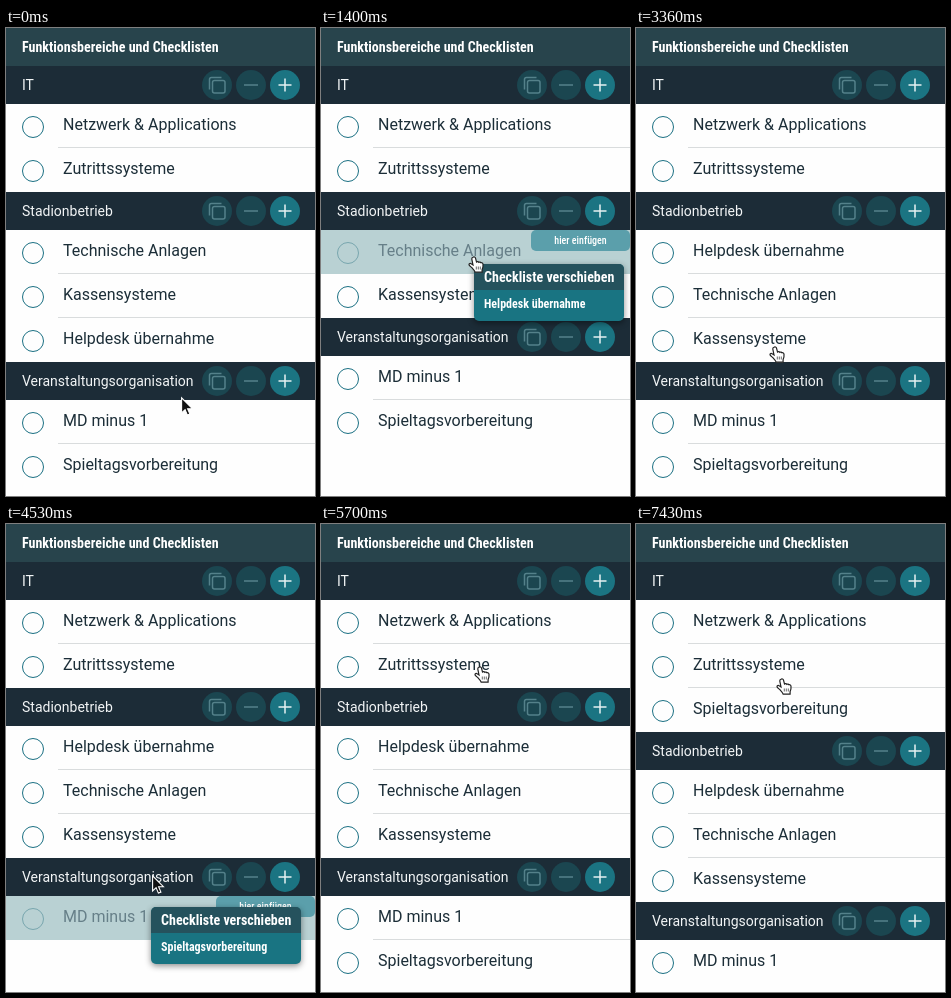
Write an HTML page that moves like this. It is 309 px wide and 468 px high and loops after 7.6 s.

```html
<!DOCTYPE html>
<html lang="de">
<head>
<meta charset="utf-8">
<title>Checklisten</title>
<style>
  html, body { margin: 0; width: 100%; height: 100%; overflow: hidden; background: #fefefe; }
  #stage { position: relative; width: 309px; height: 468px; overflow: hidden; background: #fefefe;
    font-family: Roboto, "Liberation Sans", sans-serif; color: #1c2e38; --fit: 1; }
  #stage * { box-sizing: border-box; white-space: nowrap; }
  #stage > * { position: absolute; left: 0; top: 0; }
  .narrow { font-family: "Roboto Condensed", Roboto, "Liberation Sans", sans-serif;
    font-stretch: 75%; font-weight: 700; color: #fff; }
  .title { width: 309px; height: 38px; padding-left: 16px; background: #28444c; line-height: 38px;
    font-size: calc(14px * var(--fit)); }
  .head { width: 309px; height: 38px; padding-left: 16px; background: #1c2c37; color: #f2f5f6;
    font-size: 14px; line-height: 38px; }
  .head svg { position: absolute; left: 195px; top: 3px; }
  .row { width: 309px; height: 44px; padding-left: 57px; font-size: 16px; line-height: 42px; }
  .row::before { content: ""; position: absolute; left: 16px; top: 12px; width: 20px; height: 20px;
    border: 1.3px solid #1b7083; border-radius: 50%; }
  .row.line::after { content: ""; position: absolute; left: 52px; right: 0; top: 43px; height: 1px;
    background: #d9dcdd; }
  .row.bare::before, .row.over::after { display: none; }
  .row.over { background: #b9d1d3; color: #667f88; }
  .row.over::before { border-color: #78a6ae; }
  #hint { width: 99px; height: 21px; left: 210px; border-radius: 5px; background: #5b9fab;
    font-size: calc(10px * var(--fit)); font-weight: 500; line-height: 21px; text-align: center; }
  #ghost { width: 150px; height: 57px; border-radius: 5px; overflow: hidden; background: #197482;
    box-shadow: 0 2px 6px rgba(0, 0, 0, .45); }
  #ghost div { height: 26px; padding-left: 10px; background: #25525d; line-height: 26px;
    font-size: calc(14px * var(--fit)); }
  #ghost p { margin: 0; padding-left: 10px; line-height: 28px; font-size: calc(12px * var(--fit)); }
</style>
</head>
<body>
<div id="stage">
  <div class="title narrow"><span id="caption">Funktionsbereiche und Checklisten</span></div>
</div>
<script>
const LOOP = 7600, HEAD = 38, ROW = 44, LAG = 40;
const heads = ["IT", "Stadionbetrieb", "Veranstaltungsorganisation"];
const names = {
  N: "Netzwerk & Applications", Z: "Zutrittssysteme",
  T: "Technische Anlagen", K: "Kassensysteme", H: "Helpdesk übernahme",
  M: "MD minus 1", S: "Spieltagsvorbereitung"
};

// [start, row order per section]
const orders = [
  [0, "NZ|TKH|MS"], [930, "NZ|TK|MS"], [1900, "NZ|TKH|MS"], [2530, "NZ|HTK|MS"],
  [4300, "NZ|HTK|M"], [5700, "NZ|HTK|MS"], [6100, "NZ|HTK|M"], [6160, "NZS|HTK|M"]
];
// [start, end, dragged row]
const drags = [[930, 1860, "H"], [4300, 5660, "S"]];
// [time, x, y] of the pointer tip
const path = [
  [0, 175, 369], [150, 173, 360], [450, 164, 322], [660, 162, 313],
  [930, 162, 313], [1030, 160, 300], [1250, 155, 244], [1400, 153, 228], [1600, 153, 217],
  [3030, 153, 217], [3130, 149, 235], [3360, 139, 318], [3560, 140, 374], [3760, 141, 398],
  [3800, 142, 400], [4100, 148, 427],
  [4300, 148, 427], [4400, 147, 412], [4490, 146, 380], [4530, 146, 351],
  [4960, 149, 183], [5000, 152, 167], [5060, 154, 165], [5200, 157, 152], [5430, 159, 142],
  [6760, 159, 143], [7160, 152, 150], [7330, 152, 150], [7430, 146, 154]
];

const stage = document.getElementById("stage");
const icons = `<svg width="100" height="32" fill="none" stroke-width="1.5">
  <g fill="#1b4650"><circle cx="16" cy="16" r="15"/><circle cx="50" cy="16" r="15"/></g>
  <circle cx="84" cy="16" r="15" fill="#1b7482"/>
  <g stroke="#54818a"><rect x="11.5" y="11.5" width="12.5" height="12.5" rx="2"/>
  <path d="M8.5 20.5V10.5a2 2 0 0 1 2-2H20.500M43 16h14"/></g>
  <path d="M77.500 16h13M84 9.500v13" stroke="#e6f1f2"/></svg>`;
const arrow = `<path d="M.6.9v15l3.500-3.300 2.300 5.500 2.500-1-2.300-5.400h4.800z"
  fill="#111" stroke="#fff" stroke-width="1.1"/>`;
const hand = `<path d="M5 1.200c1-.6 2.200-.1 2.500.9l1 3.900c.8-.6 1.800-.4 2.200.3.8-.5 1.800-.2 2.200.5
  1-.3 2 .2 2.100 1.400.2 2-.1 4-.9 5.400v2.600H7.200c-.6-1.600-2-3.100-3.200-4.400C2.700 10.600 1.200 9.500 1 8.800
  c-.2-1.200 1.200-1.700 2.200-1l1.800 1.200-1.200-5.900c-.2-.8.200-1.500 1.200-1.900z"
  fill="#fff" stroke="#222" stroke-width="1.2"/>
  <path d="M8.300 10.500v3M10.300 10.500v3M12.300 10.500v3" stroke="#444" stroke-width=".8"/>`;

function add(cls, html, id = "") {
  const el = document.createElement("div");
  el.className = cls;
  el.id = id;
  el.innerHTML = html;
  stage.append(el);
  return el;
}
const move = (el, x, y) => { el.style.transform = `translate(${x}px, ${y}px)`; };
const show = (el, on) => { el.style.visibility = on ? "visible" : "hidden"; };

const rows = {};
for (const key in names) rows[key] = add("row", names[key].replace("&", "&amp;"));
const bars = heads.map(text => add("head", text + icons));
const hint = add("narrow", "hier einfügen", "hint");
const ghost = add("narrow", "<div>Checkliste verschieben</div><p></p>", "ghost");
const label = ghost.querySelector("p");
const drawn = svg => add("", `<svg width="18" height="20" style="display:block;overflow:visible">${svg}</svg>`);
const arrowEl = drawn(arrow), handEl = drawn(hand);

// Smaller type where no condensed face is available
if (document.getElementById("caption").offsetWidth > 207) stage.style.setProperty("--fit", .885);

function pointer(t) {
  const i = path.findIndex(p => p[0] > t);
  if (i < 0) return path[path.length - 1].slice(1);
  const [a, b] = [path[i - 1], path[i]];
  const k = (t - a[0]) / (b[0] - a[0]);
  return [1, 2].map(n => Math.round(a[n] + (b[n] - a[n]) * k));
}

function layout(t) {
  const order = orders.filter(o => o[0] <= t).pop()[1];
  const placed = [];
  let y = HEAD;
  order.split("|").forEach((keys, i) => {
    move(bars[i], 0, y);
    y += HEAD;
    [...keys].forEach((key, n) => {
      placed.push({ key, y, line: n < keys.length - 1, bare: i === 0 && t >= 6100 && t < 6300 });
      y += ROW;
    });
  });
  return placed;
}

function draw(t) {
  const placed = layout(t);
  const drag = drags.find(d => t >= d[0] && t < d[1]);
  const [x, y] = pointer(t);
  let over = null;

  show(ghost, drag);
  show(hint, drag);
  if (drag) {
    const [gx, gy] = pointer(Math.max(drag[0], t - LAG));
    over = placed.find(p => p.y + ROW > gy) || placed[placed.length - 1];
    move(ghost, gx - 1, gy + 4);
    move(hint, 0, over.y);
    label.textContent = names[drag[2]];
  }

  for (const key in rows) show(rows[key], false);
  for (const p of placed) {
    const el = rows[p.key];
    show(el, true);
    move(el, 0, p.y);
    el.classList.toggle("line", p.line);
    el.classList.toggle("bare", p.bare);
    el.classList.toggle("over", p === over);
  }

  const onRow = placed.some(p => y >= p.y && y < p.y + ROW);
  show(handEl, onRow);
  show(arrowEl, !onRow);
  move(handEl, x - 6, y);
  move(arrowEl, x, y);
}

const start = performance.now();
function tick() {
  draw((performance.now() - start) % LOOP);
  requestAnimationFrame(tick);
}
tick();
</script>
</body>
</html>
```
